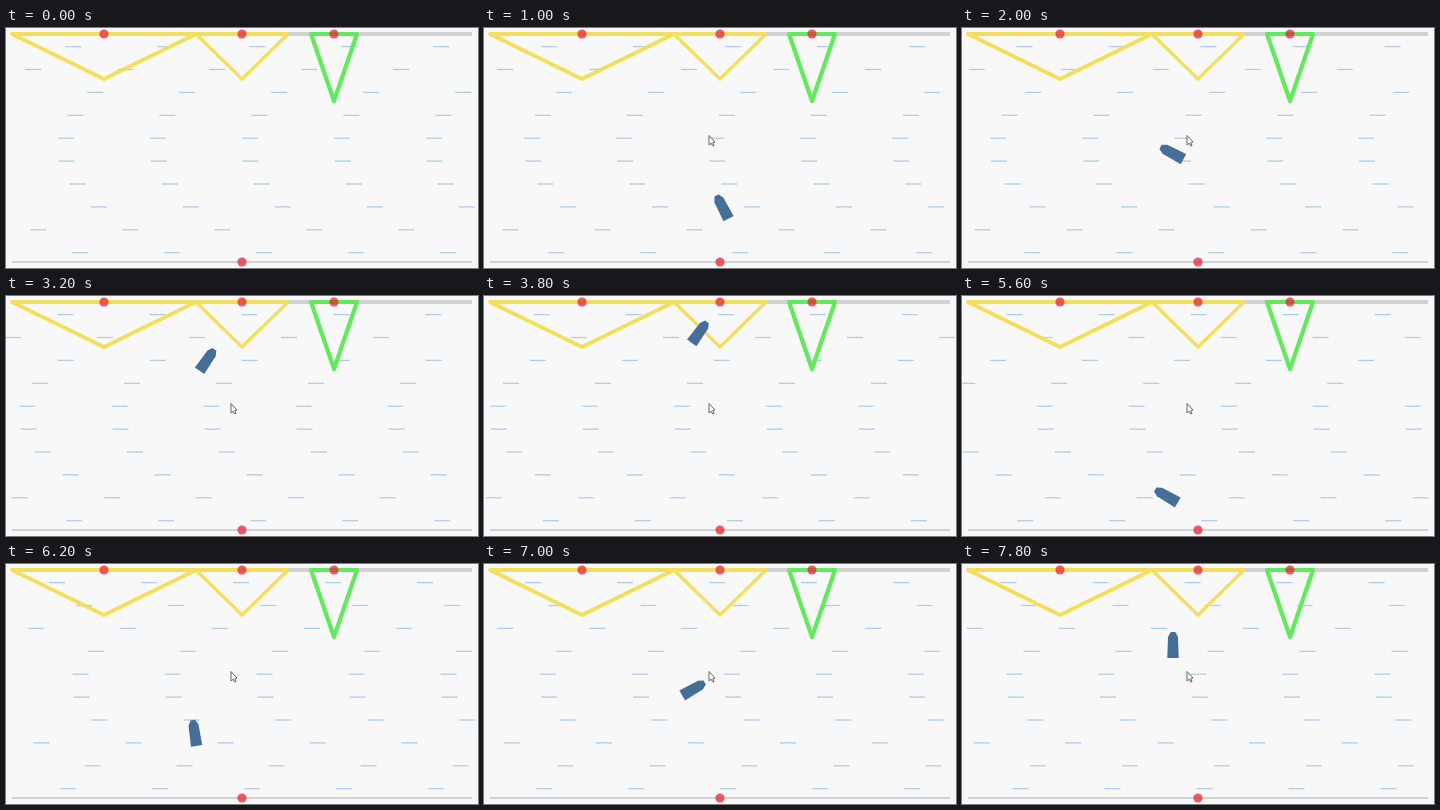
These frames come from a looping animation (472x240 px, 8000 ms). An HTML page with a canvas:

```html
<!DOCTYPE html>
<html lang="en">
<head>
<meta charset="utf-8">
<title>River crossing</title>
<style>
html, body { margin: 0; width: 100%; height: 100%; overflow: hidden; background: #f8f8f8; }
canvas { display: block; }
</style>
</head>
<body>
<canvas id="stage" width="472" height="240"></canvas>
<script>
const ctx = document.getElementById("stage").getContext("2d");
const LOOP = 8000, STEP = 200;
const LEFT = 6, RIGHT = 466, TOP = 6, BOTTOM = 234;
const ROWS = 10, ROW_GAP = 22.9, DASH_GAP = 92, DASH_LENGTH = 16;
const BOAT_SPEED = 62; // px per second

// Key points of each crossing: [ms, x, y, heading in degrees clockwise from up]
const crossings = [
  [[200, 236, 234, 0], [2000, 210, 125, -62], [3200, 201, 64, 35], [4600, 239, 0.5, 37]],
  [[4800, 236, 234, -20], [5600, 204.5, 200, -60], [7000, 209.5, 125, 60], [7800, 211, 81, 0]]
];

const mix = (a, b, u) => a + (b - a) * u;
const wrap = (x, size) => (x % size + size) % size;
const radians = degrees => degrees * Math.PI / 180;

// Parabolic current: still at the banks, fastest in the middle.
const current = y => 4 * (y - TOP) * (BOTTOM - y) / (BOTTOM - TOP) ** 2;

// Distance the water in mid-river has travelled, gaining a little speed.
const drift = seconds => 127 + 11.55 * seconds + 0.165 * seconds ** 2;

function hermite(p, v, q, w, u) {
  const u2 = u * u, u3 = u2 * u;
  return (2 * u3 - 3 * u2 + 1) * p + (u3 - 2 * u2 + u) * v
    + (3 * u2 - 2 * u3) * q + (u3 - u2) * w;
}

function velocity([, , y, heading]) {
  const angle = radians(heading);
  return [BOAT_SPEED * Math.sin(angle) - 13 * current(y), -BOAT_SPEED * Math.cos(angle)];
}

function boatAt(t) {
  const keys = crossings.find(k => t >= k[0][0] && t <= k.at(-1)[0]);
  if (!keys) return null;
  const next = keys.findIndex((key, i) => i > 0 && t <= key[0]);
  const a = keys[next - 1], b = keys[next];
  const span = b[0] - a[0], u = (t - a[0]) / span;
  const va = velocity(a), vb = velocity(b), seconds = span / 1000;
  const along = axis =>
    hermite(a[axis + 1], va[axis] * seconds, b[axis + 1], vb[axis] * seconds, u);
  return { x: along(0), y: along(1), angle: radians(mix(a[3], b[3], u)) };
}

function path(points, closed = true) {
  ctx.beginPath();
  points.forEach(([x, y]) => ctx.lineTo(x, y));
  if (closed) ctx.closePath();
}

function stroke(width, color) {
  ctx.lineWidth = width;
  ctx.strokeStyle = color;
  ctx.stroke();
}

function line(x1, x2, y, width, color) {
  path([[x1, y], [x2, y]], false);
  stroke(width, color);
}

function triangle(left, right, depth, width, color) {
  path([[left, TOP], [right, TOP], [(left + right) / 2, depth]]);
  stroke(width, color);
  line(left, right, TOP, 4, color);
}

function dot(x, y) {
  ctx.fillStyle = "rgba(230, 40, 56, 0.76)";
  ctx.beginPath();
  ctx.arc(x, y, 4.6, 0, 2 * Math.PI);
  ctx.fill();
}

function drawWater(t) {
  const distance = drift(t / 1000), field = RIGHT - LEFT, edge = 4;
  for (let row = 0; row < ROWS; row++) {
    const y = 18.6 + ROW_GAP * row;
    for (let offset = 0; offset < field; offset += DASH_GAP) {
      const x = edge + wrap(2 + offset - distance * current(y) - edge, field);
      line(x - DASH_LENGTH / 2, x + DASH_LENGTH / 2, y, 1.3, "#aecdea");
    }
  }
}

function drawBanks() {
  line(LEFT, RIGHT, TOP, 4, "#d2d2d2");
  line(LEFT, RIGHT, BOTTOM, 2, "#d2d2d2");
  triangle(6, 190, 51, 4, "#f4df5c");
  triangle(190, 282, 51, 3.2, "#f4df5c");
  triangle(305, 351, 73, 4.2, "#60ea5c");
  [98, 236, 328].forEach(x => dot(x, TOP));
  dot(236, BOTTOM);
}

function drawBoat({ x, y, angle }) {
  ctx.save();
  ctx.translate(x, y);
  ctx.rotate(angle);
  ctx.fillStyle = "#456f98";
  path([[-2.3, -13], [2.3, -13], [5, -8], [5.7, 13], [-5.7, 13], [-5, -8]]);
  ctx.fill();
  ctx.restore();
}

function drawPointer() {
  path([[225, 107.5], [225, 117], [227.2, 115.2], [228.6, 118],
    [230, 117.4], [228.8, 114.6], [231, 114]]);
  ctx.fillStyle = "#fff";
  ctx.fill();
  stroke(1, "#666");
}

function draw(now) {
  const t = Math.floor(now % LOOP / STEP) * STEP;
  ctx.fillStyle = "#f8f8f8";
  ctx.fillRect(0, 0, 472, 240);
  ctx.lineJoin = "round";
  drawWater(t);
  drawBanks();
  const boat = boatAt(t);
  if (boat) drawBoat(boat);
  if (t >= STEP) drawPointer();
}

const began = performance.now();
function tick() {
  draw(performance.now() - began);
  requestAnimationFrame(tick);
}
tick();
</script>
</body>
</html>
```
